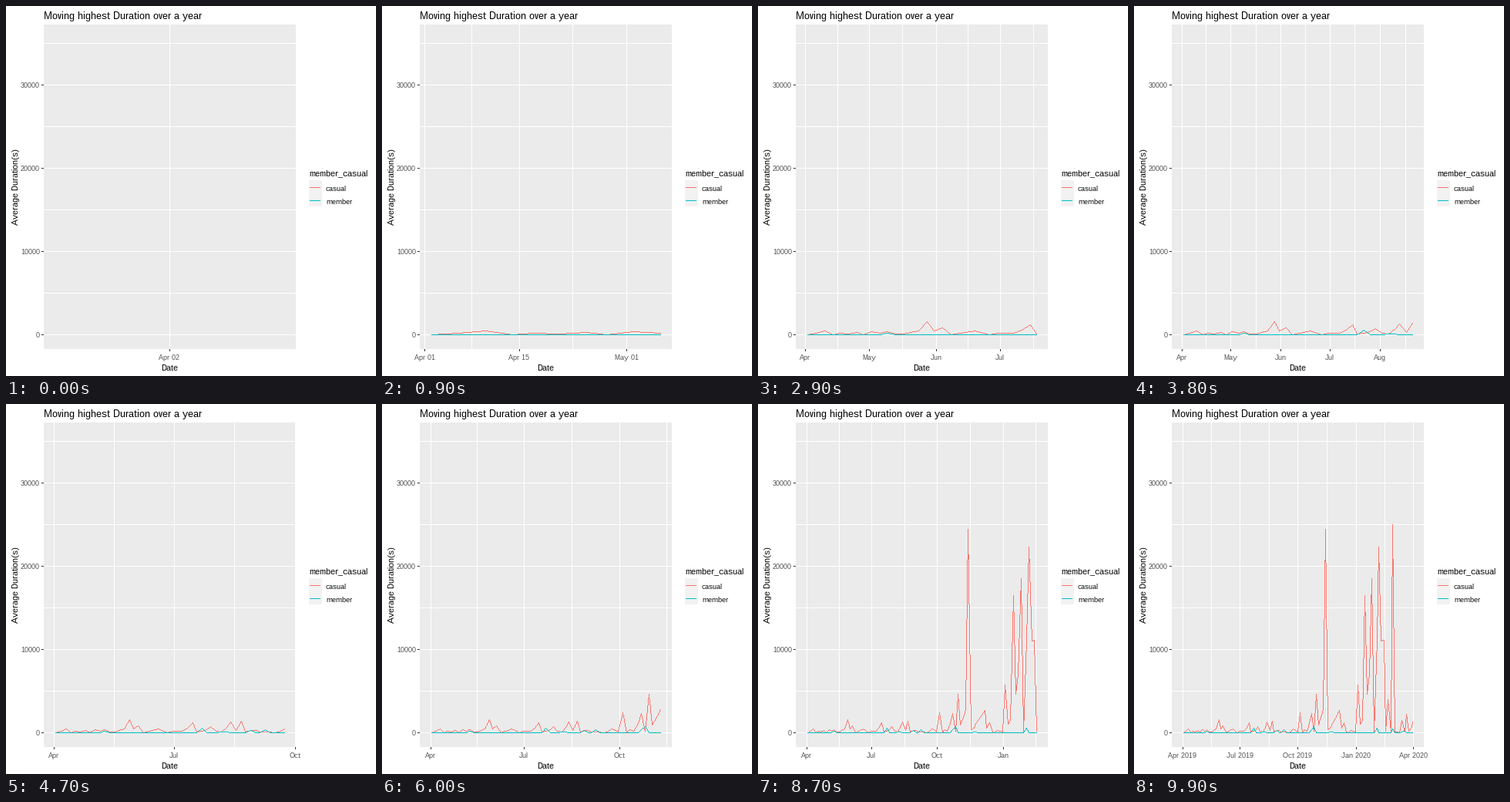
Animation, 480 px wide and 480 px high, one loop 10 s. Source, as a matplotlib script:

```python
import matplotlib.pyplot as plt
import numpy as np
from matplotlib.animation import FuncAnimation
from matplotlib.collections import PolyCollection
from matplotlib.patches import Rectangle

SIZE, DPI, FRAMES = 480, 96, 100
LEFT, RIGHT, TOP, BOTTOM = 49, 376, 24, 445
PAD = (RIGHT - LEFT) * 0.05 / 1.1
RED, CYAN = "#F8766D", "#00BFC4"
TICK, LABEL = "#333333", "#4D4D4D"

# Days since the first date, one sample per animation step
START = np.datetime64("2019-04-02")
DAYS = np.minimum(np.ceil(np.arange(FRAMES) * 365 / 99), 364)


def spikes(base, peaks):
    """Add (step, height, rise) peaks: a linear climb, then a sheer drop."""
    for step, height, rise in peaks:
        before = step - np.arange(FRAMES)
        ramp = np.where(before >= 0, 1 - before / rise, 0)
        base = np.maximum(base, height * ramp)
    return base


noise = np.random.default_rng(4).random(FRAMES)
noise[0] = 0
CASUAL = spikes(30 + 450 * noise ** 2, [
    (15, 1580, 1), (17, 850, 1), (28, 1200, 2), (32, 700, 2), (36, 1300, 2),
    (38, 1400, 1), (50, 2450, 1), (55, 2300, 2), (57, 4650, 1), (60, 2750, 3),
    (61, 24400, 1), (67, 2700, 5), (69, 1200, 2), (75, 5700, 1), (77, 1500, 3),
    (78, 16500, 1), (80, 7000, 3), (81, 18500, 1), (84, 22300, 2),
    (85, 11000, 1), (86, 11100, 1), (88, 3950, 1), (90, 25000, 1),
    (94, 1500, 1), (96, 2200, 1), (99, 1250, 2)])
MEMBER = spikes(np.zeros(FRAMES), [
    (10, 200, 1), (30, 550, 1), (35, 100, 3), (40, 300, 1), (43, 400, 1),
    (56, 700, 2), (64, 100, 3), (83, 600, 1), (90, 450, 1), (95, 200, 2)])

# Candidate axis breaks, from fine to coarse: (step in days, positions)
YEAR = 365.25
months = np.arange("2019-01", "2021-01", dtype="datetime64[M]")
firsts = (months.astype("datetime64[D]") - START).astype(int)
STEPS = [
    (1, np.arange(-1, 60)),
    (2, np.arange(-1, 60, 2)),
    (7, np.arange(-29, 450, 7)),
    (YEAR / 24, np.sort(np.concatenate([firsts, firsts + 14]))),
    (YEAR / 12, firsts),
    (YEAR / 4, firsts[::3]),
    (YEAR / 2, firsts[::6]),
]
NAMES = "Jan Feb Mar Apr May Jun Jul Aug Sep Oct Nov Dec".split()


def pretty(lo, hi, n=5):
    """Date breaks covering lo..hi in about n intervals, and their step index."""
    def cover(i):
        at = STEPS[i][1]
        a = np.searchsorted(at, lo, "right") - 1
        return at[max(a, 0):np.searchsorted(at, hi) + 1]

    def miss(at):
        return abs(len(at) - 1 - n)

    i = int(np.argmin([abs((hi - lo) / s - n) for s, _ in STEPS]))
    at = cover(i)
    if miss(at):
        j = min(max(i + (1 if len(at) - 1 > n else -1), 0), len(STEPS) - 1)
        other = cover(j)
        if miss(other) < miss(at):
            return other, j
    return at, i


def date_label(day, step, span):
    year, month, dom = str(START + int(day)).split("-")
    name = NAMES[int(month) - 1]
    if step < 4:
        return f"{name} {dom}"
    return name if span < YEAR else f"{name} {year}"


def y_px(value):
    return np.rint(426 - np.asarray(value) * 0.0108)


plt.rcParams.update({"font.family": "Liberation Sans",
                     "text.hinting": "default", "text.hinting_factor": 1})
fig = plt.figure(figsize=(SIZE / DPI, SIZE / DPI), dpi=DPI, facecolor="white")
ax = fig.add_axes([0, 0, 1, 1])
ax.set_xlim(0, SIZE)
ax.set_ylim(SIZE, 0)
ax.axis("off")


def box(x, y, w, h, color):
    return ax.add_patch(Rectangle((x, y), w, h, fc=color, ec="none", lw=0))


def text(x, y, s, size, color="black", ha="left", **kw):
    return ax.text(x, y, s, fontsize=size * 72 / DPI, color=color, ha=ha,
                   va="baseline", **kw)


def trace(color, z):
    return ax.add_collection(
        PolyCollection([], facecolors=color, edgecolors="none", linewidths=0,
                       zorder=z), autolim=False)


CORNERS = np.array([(0, 0), (1, 0), (1, 1), (0, 1)])


def pixel_line(x, y):
    """Unit squares along a polyline, for a crisp one-pixel stroke."""
    pts = np.column_stack([x, y])
    runs = [np.linspace(p, q, int(abs(q - p).max()) + 1)
            for p, q in zip(pts[:-1], pts[1:])]
    return np.rint(np.concatenate(runs))[:, None] + CORNERS


box(LEFT, TOP, RIGHT - LEFT, BOTTOM - TOP, "#EBEBEB")
for v in range(0, 40000, 5000):
    y = y_px(v)
    box(LEFT, y, RIGHT - LEFT, 1, "white")
    if v % 10000 == 0:
        box(LEFT - 3, y, 3, 1, TICK)
        text(44, y + 4, str(v), 9, LABEL, "right")

text(49, 17, "Moving highest Duration over a year", 13)
text(212, 473, "Date", 11, ha="center")
text(16, 235, "Average Duration(s)", 11, ha="center", rotation=90,
     rotation_mode="anchor")

text(393, 220, "member_casual", 11)
for y, name, color in [(226, "casual", RED), (243, "member", CYAN)]:
    box(393, y, 17, 17, "#F2F2F2")
    box(394, y + 9, 14, 1, color)
    text(415, y + 14, name, 9)

casual, member = trace(RED, 3), trace(CYAN, 4)
axis_parts = []


def grid(x):
    axis_parts.append(box(x, TOP, 1, BOTTOM - TOP, "white"))


def major(x, label):
    grid(x)
    axis_parts.append(box(x, BOTTOM, 1, 3, TICK))
    axis_parts.append(text(x, 459, label, 9, LABEL, "center"))


def update(k):
    while axis_parts:
        axis_parts.pop().remove()
    span = DAYS[k]
    if span == 0:
        major((LEFT + RIGHT) // 2, date_label(0, 0, 0))
        casual.set_verts([])
        member.set_verts([])
        return []

    def x_px(day):
        return np.rint(LEFT + PAD + (RIGHT - LEFT - 2 * PAD) * day / span)

    lo, hi = -0.05 * span, 1.05 * span
    at, step = pretty(lo, hi)
    for day in (at[1:] + at[:-1]) / 2:
        if lo <= day <= hi:
            grid(x_px(day))
    for day in at:
        if lo <= day <= hi:
            major(x_px(day), date_label(day, step, hi - lo))

    xs = x_px(DAYS[:k + 1])
    for series, values in ((casual, CASUAL), (member, MEMBER)):
        series.set_verts(pixel_line(xs, y_px(values[:k + 1])))
    return []


anim = FuncAnimation(fig, update, frames=FRAMES, interval=100, repeat=True)
plt.show()
```
